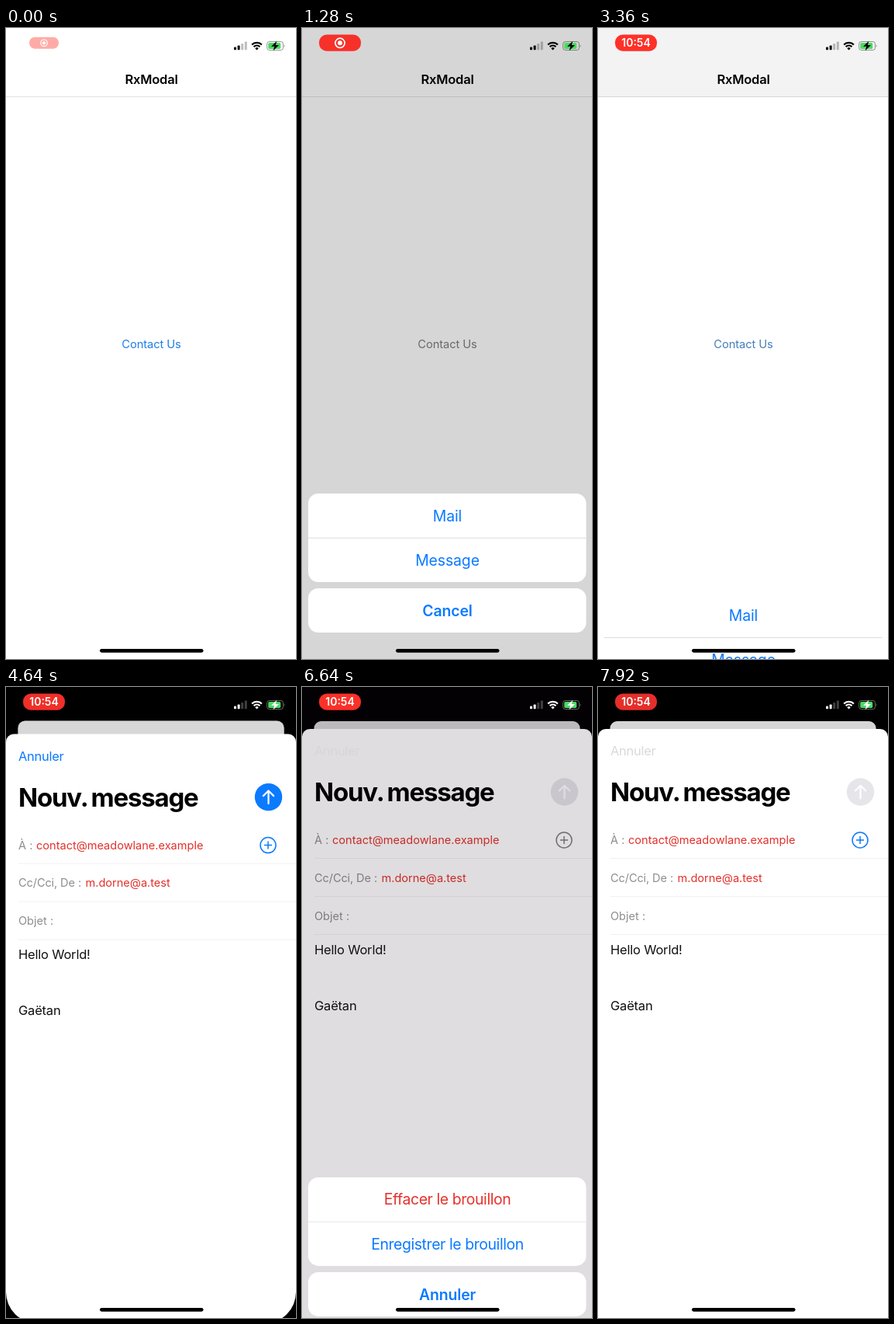
Animation of 374x812 px, one loop 8000 ms. Source, as an HTML page:

```html
<!DOCTYPE html>
<html lang="fr">
<head>
<meta charset="utf-8">
<title>RxModal</title>
<style>
  html, body { margin: 0; width: 100%; height: 100%; overflow: hidden; background: #fff; }
  svg { display: block; width: 374px; height: 812px; }
  text { font-family: Inter, Roboto, sans-serif; font-size: 16.5px; }
  .mid { text-anchor: middle; }
  .semi { font-weight: 600; }
  .field { font-size: 14.55px; }
  .label { fill: #8e8e92; }
  .addr { fill: #e4302a; }
  .body { fill: #111; letter-spacing: -.2px; }
  .row { font-size: 19.4px; fill: #0a7aff; letter-spacing: -.1px; text-anchor: middle; }
  .long { letter-spacing: -.4px; }
  .line { stroke: #f1f1f3; }
</style>
</head>
<body>
<svg viewBox="0 0 374 812">
  <rect id="backdrop" width="374" height="812"/>

  <g id="home">
    <rect id="page" width="374" height="812" fill="#fff"/>
    <path d="M0 88.5H374" stroke="#e2e2e4"/>
    <text class="mid semi" x="187.5" y="72" letter-spacing="-.2">RxModal</text>
    <text id="contact" class="mid" x="187.5" y="411.5" style="font-size:14.7px" letter-spacing="-.1">Contact Us</text>
    <rect id="pageDim" width="374" height="812"/>
  </g>
  <rect id="headDim" width="374" height="89"/>
  <rect id="bodyDim" y="89" width="374" height="723"/>

  <g id="compose">
    <path id="paper" fill="#fff"/>
    <text id="cancel" x="16" y="88" letter-spacing="-.3">Annuler</text>
    <text x="16" y="147" font-weight="700" style="font-size:33px" letter-spacing="-1.2" word-spacing="-1.5">Nouv. message</text>
    <circle id="send" cx="338.5" cy="135" r="17.7"/>
    <path d="M338.5 143.5V127M331.8 133.5L338.5 126.8L345.2 133.5" fill="none" stroke="#fff" stroke-width="2.2" stroke-linecap="round" stroke-linejoin="round"/>
    <text class="field label" x="16" y="202">À :</text>
    <text class="field addr" x="39" y="202">contact@meadowlane.example</text>
    <path id="add" d="M348 197a10 10 0 1 0-20 0a10 10 0 1 0 20 0M333 197h10M338 192v10" fill="none" stroke-width="1.5"/>
    <text class="field label" x="16" y="250.5" letter-spacing="-.1">Cc/Cci, De :</text>
    <text class="field addr" x="102.5" y="250.5">m.dorne@a.test</text>
    <text class="field label" x="16" y="299.5">Objet :</text>
    <path class="line" d="M16 220.5H374M16 269.5H374M16 318.5H374"/>
    <text class="body" x="16" y="343.5">Hello World!</text>
    <text class="body" x="16" y="415.5">Gaëtan</text>
  </g>
  <rect id="draftDim" width="374" height="812" fill="#180818"/>

  <g id="status">
    <rect x="294" y="24.5" width="3" height="3.7" rx=".8"/>
    <rect x="298.6" y="22.5" width="3" height="5.7" rx=".8"/>
    <g opacity=".25">
      <rect x="303.2" y="20" width="3" height="8.2" rx=".8"/>
      <rect x="307.8" y="17.5" width="3" height="10.7" rx=".8"/>
    </g>
    <path d="M317.1 21.6A9 9 0 0 1 329.9 21.6M319.6 24.1A5.5 5.5 0 0 1 327.4 24.1" fill="none" stroke="currentColor" stroke-width="2.2"/>
    <path d="M323.5 28.6L321.3 26.3A3 3 0 0 1 325.7 26.3z"/>
    <rect x="336.6" y="17.5" width="20.8" height="11" rx="3" fill="none" stroke="currentColor" stroke-opacity=".4"/>
    <path d="M358.6 21.2q2 1.8 0 3.6z" opacity=".4"/>
    <rect x="338.2" y="19.1" width="16" height="7.8" rx="1.6" fill="#4cd964"/>
    <path d="M349.3 16.8L342 23.8H346.2L344.6 29.2L352 22.1H347.7z"/>
  </g>

  <g id="pill" fill="#fff">
    <rect id="pillBack" x="22" y="8.5" width="54" height="21.3" rx="10"/>
    <g id="record">
      <circle cx="49" cy="19.3" r="6.1" fill="none" stroke="#fff" stroke-width="1.7"/>
      <circle cx="49" cy="19.3" r="3"/>
    </g>
    <text id="clock" class="mid semi" x="49" y="24.3" style="font-size:14px">10:54</text>
  </g>

  <g id="choices">
    <rect x="8" y="599" width="358.5" height="114" rx="13" fill="#fff"/>
    <path d="M8 656.3H366.5" stroke="#dcdcdf"/>
    <text class="row" x="187.5" y="634.5">Mail</text>
    <text class="row" x="187.5" y="692">Message</text>
    <rect x="8" y="721" width="358.5" height="57" rx="13" fill="#fff"/>
    <text class="row semi" x="187.5" y="757">Cancel</text>
  </g>

  <g id="draft">
    <rect x="8" y="599" width="358.5" height="114" rx="13" fill="#fff"/>
    <path d="M8 656.3H366.5" stroke="#e4e4e7"/>
    <text class="row long" x="187.5" y="634.5" style="fill:#e8312a">Effacer le brouillon</text>
    <text class="row long" x="187.5" y="692">Enregistrer le brouillon</text>
    <rect x="8" y="721" width="358.5" height="57" rx="13" fill="#fff"/>
    <text class="row semi" x="187.5" y="757">Annuler</text>
  </g>

  <rect x="121" y="799" width="133.5" height="4.7" rx="2.35"/>
</svg>
<script>
const LOOP = 8000, DIM = 0.16;
const BLUE = [10, 122, 255], GREY = [125, 125, 128];
const el = {};
document.querySelectorAll('[id]').forEach(e => el[e.id] = e);

const set = (id, attrs) => {
  for (const name in attrs) el[id].setAttribute(name, attrs[name]);
};
const mix = (a, b, p) => `rgb(${a.map((v, i) => Math.round(v + (b[i] - v) * p))})`;

// Critically damped spring: 1 before start, settling to 0.
const settle = (t, start, rate) => {
  const x = Math.max(0, (t - start) / 1000 * rate);
  return (1 + x) * Math.exp(-x);
};
const shown = (t, open, close) => (1 - settle(t, open, 14)) * settle(t, close, 14);

function slide(id, amount) {
  set(id, {
    transform: `translate(0 ${213 * (1 - amount)})`,
    visibility: amount > 0.004 ? 'visible' : 'hidden'
  });
}

function drawPill(t) {
  const size = Math.min(1, Math.abs(t + 128) / 320, Math.abs(t - 2240) / 320);
  const glow = 0.5 + 0.5 * Math.cos((t - 1600) / 1750 * 2 * Math.PI);
  set('pill', {
    opacity: size,
    transform: `translate(49 19.3) scale(${0.5 + size / 2}) translate(-49 -19.3)`
  });
  set('pillBack', { fill: mix([227, 46, 42], [255, 49, 40], glow) });
  set('record', { opacity: t < 2240 ? 1 : 0 });
  set('clock', { opacity: t < 2240 ? 0 : 1 });
}

function drawChoices(t) {
  const s = shown(t, 240, 3216);
  slide('choices', s);
  set('contact', { fill: mix([30, 125, 230], GREY, s) });
  set('headDim', { opacity: DIM * s ** 1.3 });
  set('bodyDim', { opacity: DIM * (t > 3216 ? Math.max(0, 2 * s - 1) : s) });
}

function drawCompose(t) {
  const rest = settle(t, 4000, 10.6), p = 1 - rest;
  const scale = 1 - p * 31 / 374;
  const foot = rest > 0.0005 ? 40 : 0;
  set('backdrop', { opacity: p > 0 ? 1 : 0 });
  set('home', { transform: `translate(${187.5 * (1 - scale)} ${44 * p}) scale(${scale})` });
  set('page', { rx: 10 * p });
  set('pageDim', { rx: 10 * p, opacity: DIM * p });
  set('compose', {
    transform: `translate(0 ${758 * rest})`,
    visibility: p > 0 ? 'visible' : 'hidden'
  });
  set('paper', {
    d: `M0 64a10 10 0 0 1 10-10H364a10 10 0 0 1 10 10V${812 - foot}` +
       `a${foot} ${foot} 0 0 1 ${-foot} ${foot}H${foot}a${foot} ${foot} 0 0 1 ${-foot} ${-foot}z`
  });
  const ink = p > 0.5 ? '#fff' : '#000';
  set('status', { fill: ink, color: ink });
}

function drawDraft(t) {
  const s = shown(t, 6400, 7380);
  const off = Math.min(1, (1 - settle(t, 6400, 14)) * 1.2);
  slide('draft', s);
  set('draftDim', { opacity: DIM * s });
  set('cancel', { fill: mix(BLUE, [217, 217, 219], off), opacity: 1 - 0.9 * s });
  set('send', { fill: mix(BLUE, [229, 229, 234], off) });
  set('add', { stroke: mix(BLUE, GREY, Math.min(1, s * 1.2)) });
}

function frame() {
  const t = performance.now() % LOOP;
  drawPill(t);
  drawChoices(t);
  drawCompose(t);
  drawDraft(t);
  requestAnimationFrame(frame);
}
frame();
</script>
</body>
</html>
```
